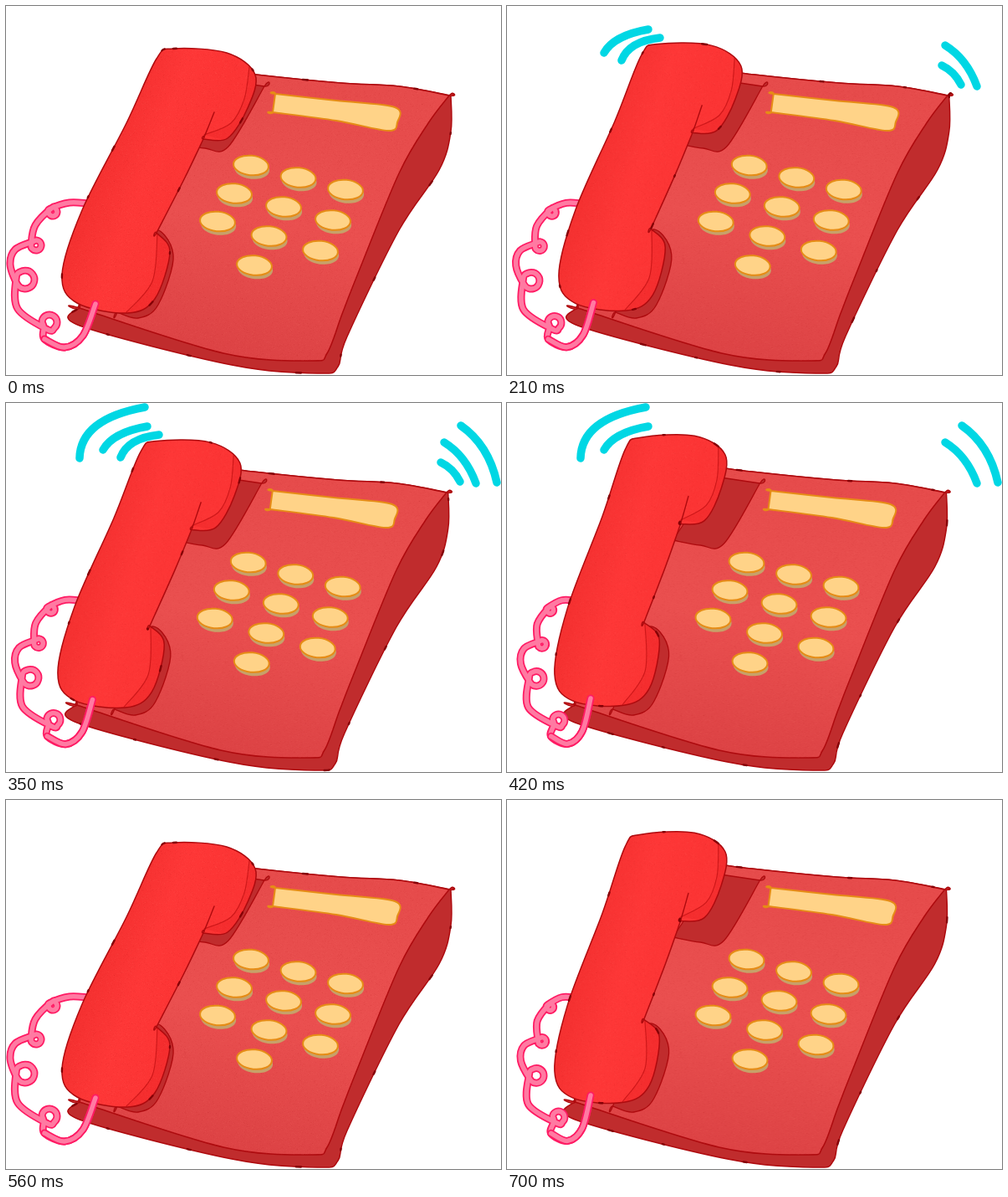
Recreate the animation shown at these times as an HTML page with a canvas. Size 592 by 441 pixels, loop 0.77 s.

```html
<!DOCTYPE html>
<html lang="en">
<head>
<meta charset="utf-8">
<title>Ringing phone</title>
<style>
html, body { margin: 0; width: 100%; height: 100%; overflow: hidden; background: #fff; }
canvas { display: block; }
</style>
</head>
<body>
<canvas id="stage" width="592" height="441"></canvas>
<script>
const ctx = document.getElementById('stage').getContext('2d');
const STEP = 70, STEPS = 11;
const LINE = '#ae0a0e', MARK = '#850006', SIDE = '#c02c2d', CREAM = '#ffd388', ORANGE = '#e68c16';

function seeded(seed) {
  return () => {
    seed = (seed * 1664525 + 1013904223) >>> 0;
    return seed / 4294967296;
  };
}

function makeGrain() {
  const size = 256, tile = document.createElement('canvas');
  tile.width = tile.height = size;
  const g = tile.getContext('2d'), rnd = seeded(7);
  for (let i = 0; i < 14000; i++) {
    g.fillStyle = rnd() < 0.5 ? 'rgba(150,0,10,.05)' : 'rgba(255,130,120,.06)';
    g.fillRect(Math.floor(rnd() * size), Math.floor(rnd() * size), 1, 1);
  }
  return ctx.createPattern(tile, 'repeat');
}
const grain = makeGrain();

// Catmull-Rom spline through [x, y, corner?] points.
function spline(points, closed = true) {
  const pts = points.flatMap(p => p[2] ? [p, p] : [p]), n = pts.length;
  const at = i => closed ? pts[(i + n) % n] : pts[Math.max(0, Math.min(n - 1, i))];
  const path = new Path2D();
  path.moveTo(pts[0][0], pts[0][1]);
  for (let i = 0; i < (closed ? n : n - 1); i++) {
    const [a, b, c, d] = [at(i - 1), at(i), at(i + 1), at(i + 2)];
    path.bezierCurveTo(b[0] + (c[0] - a[0]) / 6, b[1] + (c[1] - a[1]) / 6,
      c[0] - (d[0] - b[0]) / 6, c[1] - (d[1] - b[1]) / 6, c[0], c[1]);
  }
  if (closed) path.closePath();
  return path;
}

function stroke(path, color, width) {
  ctx.strokeStyle = color;
  ctx.lineWidth = width;
  ctx.stroke(path);
}

function shape(path, fill, line, width = 1.5) {
  ctx.fillStyle = fill;
  ctx.fill(path);
  if (line) stroke(path, line, width);
}

function gradient(x0, y0, x1, y1, ...colors) {
  const g = ctx.createLinearGradient(x0, y0, x1, y1);
  colors.forEach((c, i) => g.addColorStop(i / (colors.length - 1), c));
  return g;
}

// Sparse ink dashes that wander along an outline
function inkMarks(path, step) {
  ctx.setLineDash([4, 97, 2, 61, 6, 128]);
  ctx.lineDashOffset = step % 4 * 37;
  stroke(path, MARK, 2.4);
  ctx.setLineDash([]);
}

const back = [[215, 71, 1], [299, 82], [400, 92], [470, 96]];
const hiddenSide = [[100, 330], [180, 180]];
const shell = spline([...back, [532, 107, 1], [532, 150], [518, 196], [470, 268], [408, 395],
  [397, 431], [375, 439], [270, 429], [88, 382], [86, 361, 1], ...hiddenSide]);
const face = spline([...back, [530, 107, 1], [505, 140], [470, 200], [420, 322], [402, 368],
  [384, 415], [365, 424], [260, 415], [88, 361, 1], ...hiddenSide]);
const upperCradle = spline([[255, 88, 1], [309, 96, 1], [266, 168], [238, 170], [205, 164, 1]]);
const lowerCradle = spline([[172, 270], [200, 297], [182, 357], [158, 373], [133, 366, 1]]);
const display = spline([[322, 105, 1], [395, 113], [465, 121], [468, 139], [457, 149], [395, 137], [319, 127, 1]]);

const handset = spline([[200, 51], [264, 56], [298, 82], [289, 122], [265, 158], [236, 159, 1],
  [213, 207], [180, 271, 1], [196, 294], [178, 350], [145, 367], [85, 355], [67, 321], [91, 244],
  [144, 140], [180, 63]]);
const earFold = spline([[249, 127], [243, 142], [236, 159]], false);

function drawKey(row, col) {
  const x = 293 - 20 * row + col * (56.5 + 2.5 * row);
  const y = 190.5 + 33.5 * row + col * (14.5 + 1.5 * row);
  const oval = (dx, dy) => {
    const path = new Path2D();
    path.ellipse(x + dx, y + dy, 21, 11.7, 0.1, 0, Math.PI * 2);
    return path;
  };
  shape(oval(1.2, 4.5), '#c7a169');
  shape(oval(0, 0), CREAM, ORANGE, 2);
}

function drawBody(swing, step) {
  ctx.save();
  ctx.translate(-6.5 * swing, 0);
  shape(shell, SIDE, LINE);
  shape(face, gradient(330, 90, 270, 425, '#e64b4b', '#ea4f4f', '#dc4244'), LINE);
  shape(face, grain);
  shape(upperCradle, SIDE, LINE, 1.3);
  shape(lowerCradle, SIDE, LINE, 1.3);
  shape(display, CREAM, ORANGE, 2);
  for (let i = 0; i < 9; i++) drawKey(Math.floor(i / 3), i % 3);
  drawKey(3, 1);
  inkMarks(shell, step);
  ctx.restore();
}

// Darker end cap between its rim line and the handset outline
function drawEar(rim, right, bottom) {
  const cap = spline(rim, false);
  cap.lineTo(right, bottom);
  cap.lineTo(right, rim[0][1]);
  ctx.save();
  ctx.clip(handset);
  shape(cap, '#f52d2e');
  stroke(spline(rim, false), '#cf1719', 1.2);
  ctx.restore();
}

function drawHandset(swing, step) {
  ctx.save();
  ctx.translate(90, 416);
  ctx.rotate(-0.108 * swing);
  ctx.translate(-90, -416);
  shape(handset, gradient(110, 190, 215, 230, '#f43030', '#fe3737', '#fc3434'));
  drawEar([[291, 73], [285, 111], [269, 140], [237, 154]], 300, 170);
  drawEar([[181, 272], [175, 329], [144, 366]], 200, 370);
  shape(handset, grain, LINE);
  stroke(earFold, LINE, 1.4);
  inkMarks(handset, step);
  ctx.restore();
}

// Knots of the cord; a third value is the radius of a curl around that knot.
const cordKnots = [[97, 236], [76, 235], [56, 246, 5], [35, 262], [36, 286, 6], [11, 291], [5, 309],
  [23, 327, 11], [14, 362], [52, 378, 9], [46, 398], [70, 408], [92, 394], [107, 356]];

function cordPoints(swing) {
  return cordKnots.flatMap(([x0, y0, radius], i) => {
    const u = i / (cordKnots.length - 1), bulge = Math.sin(Math.PI * u);
    const x = x0 + swing * (24 * bulge - 17 + 10 * u);
    const y = y0 + swing * (4 * bulge - 3 * u);
    if (!radius) return [[x, y]];
    const r = radius * (1 - 0.2 * swing), outward = Math.atan2(y0 - 315, x0 - 90);
    return Array.from({ length: 7 }, (_, k) => {
      const a = outward - 0.3 - k * (2 * Math.PI - 0.6) / 6;
      return [x + r * Math.cos(a), y + r * Math.sin(a)];
    });
  });
}

function drawCord(pts) {
  const path = spline(pts, false);
  stroke(path, '#ff1a63', 9);
  stroke(path, '#ff7aa2', 5.5);
}

// Left and right ring waves, from the inside out
const waves = [
  [[137, 65, 146, 42, 183, 38], [520, 71, 535, 78, 543, 94]],
  [[116, 56, 128, 35, 169, 28], [524, 47, 550, 63, 562, 96]],
  [[88, 66, 89, 19, 166, 5], [544, 27, 577, 50, 587, 95]]
];

function drawWaves(step) {
  waves.forEach((pair, k) => {
    if (step < k + 2 || step > k + 5) return;
    for (const [x, y, ...rest] of pair) {
      const path = new Path2D();
      path.moveTo(x, y);
      path.quadraticCurveTo(...rest);
      stroke(path, '#00d7e4', 9.5);
    }
  });
}

function draw(step) {
  const swing = (1 - Math.cos(step * Math.PI / 2)) / 2; // 0 leans right, 1 leans left
  const cord = cordPoints(swing);
  ctx.fillStyle = '#fff';
  ctx.fillRect(0, 0, 592, 441);
  ctx.lineCap = ctx.lineJoin = 'round';
  drawBody(swing, step);
  drawCord(cord);
  drawHandset(swing, step);
  drawCord(cord.slice(-4)); // the plugged end lies over the handset
  drawWaves(step);
}

const start = performance.now();
function tick() {
  draw(Math.floor((performance.now() - start) / STEP) % STEPS);
  requestAnimationFrame(tick);
}
tick();
</script>
</body>
</html>
```
